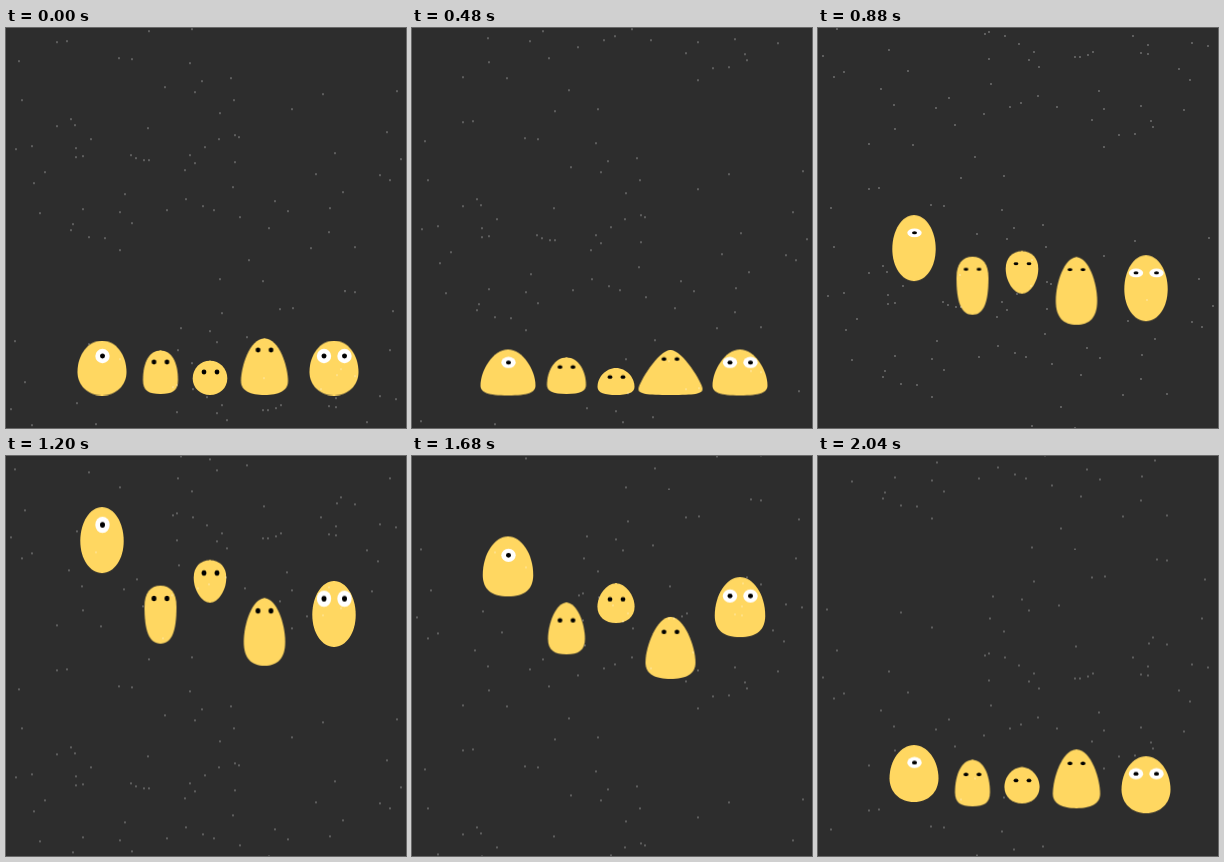
Animation of 400 by 400 pixels, one loop 2.08 s. Source, as an HTML page without scripts:

```html
<!DOCTYPE html>
<html lang="en">
<head>
<meta charset="utf-8">
<title>Jumping eggs</title>
<style>
html, body { margin: 0; width: 100%; height: 100%; overflow: hidden; background: #2d2d2d; }
svg { display: block; width: 100%; height: 100%; }

.stars { fill: none; stroke: #fff; stroke-opacity: .55; stroke-width: 1.6; stroke-linecap: round; animation: fall 2080ms linear infinite; }
.jump { animation: jump 2080ms linear infinite; }
.face { animation: face 2080ms linear infinite; }
.body { fill: #ffd761; animation: morph 2080ms linear infinite; }
.white { fill: #fff; }

@keyframes fall { to { transform: translateY(347px); } }

/* --h1..--h6: height above the ground along the jump */
@keyframes jump {
  0%, 25% { transform: translateY(0); animation-timing-function: cubic-bezier(.33, 0, .67, .57); }
  42.31% { transform: translateY(var(--h1)); animation-timing-function: cubic-bezier(.33, .32, .67, .71); }
  57.69% { transform: translateY(var(--h2)); animation-timing-function: cubic-bezier(.33, .6, .67, 1); }
  69.23% { transform: translateY(var(--h3)); animation-timing-function: cubic-bezier(.33, 0, .67, .16); }
  73.08% { transform: translateY(var(--h4)); animation-timing-function: cubic-bezier(.33, .15, .67, .61); }
  88.46% { transform: translateY(var(--h5)); }
  98.08% { transform: translateY(var(--h6)); }
  100% { transform: translateY(0); }
}

/* rest, squash, rise, apex, drop */
@keyframes morph {
  0%, 100% { d: var(--rest); animation-timing-function: ease-out; }
  23.08%, 25% { d: var(--squash); }
  42.31%, 57.69% { d: var(--rise); }
  73.08% { d: var(--apex); }
  88.46% { d: var(--drop); }
}

@keyframes face {
  0%, 100% { transform: translateY(var(--e1)) scaleY(1); }
  23.08%, 25% { transform: translateY(var(--e2)) scaleY(.78); }
  42.31% { transform: translateY(var(--e3)) scaleY(.6); }
  57.69% { transform: translateY(var(--e3)) scaleY(1.14); }
  73.08% { transform: translateY(var(--e4)) scaleY(.76); }
  88.46% { transform: translateY(var(--e5)) scaleY(1.08); }
  98.08% { transform: translateY(var(--e1)) scaleY(.76); }
}

/* Right halves; each is mirrored in the markup */
.egg {
  --rest: path("M-1-55H0C13.5-55 24.5-41 24.5-23.5C24.5-10 14 0 0 0H-1Z");
  --squash: path("M-1-46H0C15-46 27.5-25 27.5-10C27.5-3 20 0 0 0H-1Z");
  --rise: path("M-1-66H0C12-66 21.7-51 21.7-32C21.7-14 12 0 0 0H-1Z");
  --apex: path("M-1-52H0C15-52 26-37 26-18C26-5 18 0 0 0H-1Z");
  --drop: path("M-1-68H0C12-68 24.5-48 24.5-25C24.5-9 15 0 0 0H-1Z");
  --e1: -39.5px; --e2: -33px; --e3: -48.3px; --e4: -37.7px; --e5: -44.5px;
}
.thumb {
  --rest: path("M-1-43.5H0C11-43.5 17.5-32 17.5-14C17.5-3 12 0 0 0H-1Z");
  --squash: path("M-1-36.5H0C12-36.5 19.5-23 19.5-9C19.5-3 14 0 0 0H-1Z");
  --rise: path("M-1-58H0C10-58 16-51 16-37C16-13 11.5 0 0 0H-1Z");
  --apex: path("M-1-41.5H0C12-41.5 19.5-30 19.5-16C19.5-4 13 0 0 0H-1Z");
  --drop: path("M-1-62H0C9-62 17.5-32 17.5-15C17.5-4 11 0 0 0H-1Z");
  --e1: -32px; --e2: -27px; --e3: -45.3px; --e4: -31px; --e5: -37px;
}
.ball {
  --rest: path("M-1-34.3H0C9.6-34.3 17.3-26.7 17.3-16.5C17.3-7 9.6 0 0 0H-1Z");
  --squash: path("M-1-27H0C10-27 18.5-18 18.5-8C18.5-2 11 0 0 0H-1Z");
  --rise: path("M-1-42.5H0C9.5-42.5 16.3-36 16.3-25C16.3-12 8 0 0 0H-1Z");
  --apex: path("M-1-32.5H0C10-32.5 18.2-26 18.2-16C18.2-6 10 0 0 0H-1Z");
  --drop: path("M-1-47H0C9-47 19-29 19-17C19-6 11 0 0 0H-1Z");
  --e1: -23px; --e2: -18px; --e3: -29.8px; --e4: -22px; --e5: -25.5px;
}
.pear {
  --rest: path("M-1-56.5H0C15-56.5 23.5-28 23.5-14C23.5-4 14 0 0 0H-1Z");
  --squash: path("M-1-45H0C12-45 32-12 32-6C32-1 24 0 0 0H-1Z");
  --rise: path("M-1-67.5H0C12-67.5 20.7-42 20.7-24C20.7-7 13 0 0 0H-1Z");
  --apex: path("M-1-54H0C14-54 25.5-30 25.5-15C25.5-4 16 0 0 0H-1Z");
  --drop: path("M-1-70H0C13-70 24.5-36 24.5-18C24.5-5 14 0 0 0H-1Z");
  --e1: -45px; --e2: -36px; --e3: -55px; --e4: -44px; --e5: -50px;
}
</style>
</head>
<body>
<svg viewBox="0 0 400 400">
  <defs>
    <g id="dots">
      <circle cx="-6.5" r="2.4"/>
      <circle cx="6.5" r="2.4"/>
    </g>
    <g id="eye">
      <circle class="white" r="7.2"/>
      <circle r="2.5"/>
    </g>
    <path id="sky" d="M143 3h0M51 14h0M61 13h0M13 33h0M113 30h0M126 31h0M184 35h0M196 53h0M225 50h0M189 64h0M159 59h0M228 72h0M214 85h0M286 81h0M317 66h0M391 63h0M16 72h0M65 91h0M69 97h0M51 98h0M85 111h0M142 100h0M10 121h0M26 118h0M70 120h0M70 129h0M77 128h0M125 127h0M130 130h0M138 132h0M143 132h0M184 127h0M199 119h0M213 111h0M229 107h0M233 109h0M229 134h0M189 135h0M179 142h0M381 104h0M395 131h0M329 125h0M39 144h0M28 155h0M119 166h0M77 181h0M34 185h0M67 196h0M65 202h0M114 184h0M126 195h0M83 209h0M99 210h0M114 222h0M161 182h0M180 171h0M197 178h0M208 182h0M227 159h0M234 189h0M269 173h0M282 183h0M310 146h0M337 164h0M324 180h0M374 147h0M384 152h0M263 200h0M323 204h0M305 220h0M349 219h0M243 232h0M214 251h0"/>
  </defs>

  <g transform="translate(96 367.5)">
    <g class="jump egg" style="--h1:-114px;--h2:-250px;--h3:-299px;--h4:-292px;--h5:-135px;--h6:-22px">
      <path class="body"/><path class="body" transform="scale(-1 1)"/>
      <g class="face"><use href="#eye" x=".5"/></g>
    </g>
  </g>
  <g transform="translate(154.5 366)">
    <g class="jump thumb" style="--h1:-79px;--h2:-178px;--h3:-221px;--h4:-216px;--h5:-99px;--h6:-16px">
      <path class="body"/><path class="body" transform="scale(-1 1)"/>
      <g class="face"><use href="#dots"/></g>
    </g>
  </g>
  <g transform="translate(204 367)">
    <g class="jump ball" style="--h1:-101px;--h2:-220px;--h3:-263px;--h4:-257px;--h5:-119px;--h6:-20px">
      <path class="body"/><path class="body" transform="scale(-1 1)"/>
      <g class="face"><use href="#dots" x=".5"/></g>
    </g>
  </g>
  <g transform="translate(258.5 367)">
    <g class="jump pear" style="--h1:-70px;--h2:-157px;--h3:-190px;--h4:-185px;--h5:-86px;--h6:-15px">
      <path class="body"/><path class="body" transform="scale(-1 1)"/>
      <g class="face"><use href="#dots"/></g>
    </g>
  </g>
  <g transform="translate(328 367.5)">
    <g class="jump egg" style="--h1:-74px;--h2:-176px;--h3:-240px;--h4:-242px;--h5:-107.5px;--h6:-10.5px">
      <path class="body"/><path class="body" transform="scale(-1 1)"/>
      <g class="face"><use href="#eye" x="-10"/><use href="#eye" x="10.5"/></g>
    </g>
  </g>

  <g class="stars">
    <use href="#sky"/>
    <use href="#sky" transform="translate(400 250) scale(-1 1)"/>
    <use href="#sky" transform="translate(400 -250) scale(-1 1)"/>
    <use href="#sky" y="-500"/>
  </g>
</svg>
</body>
</html>
```
